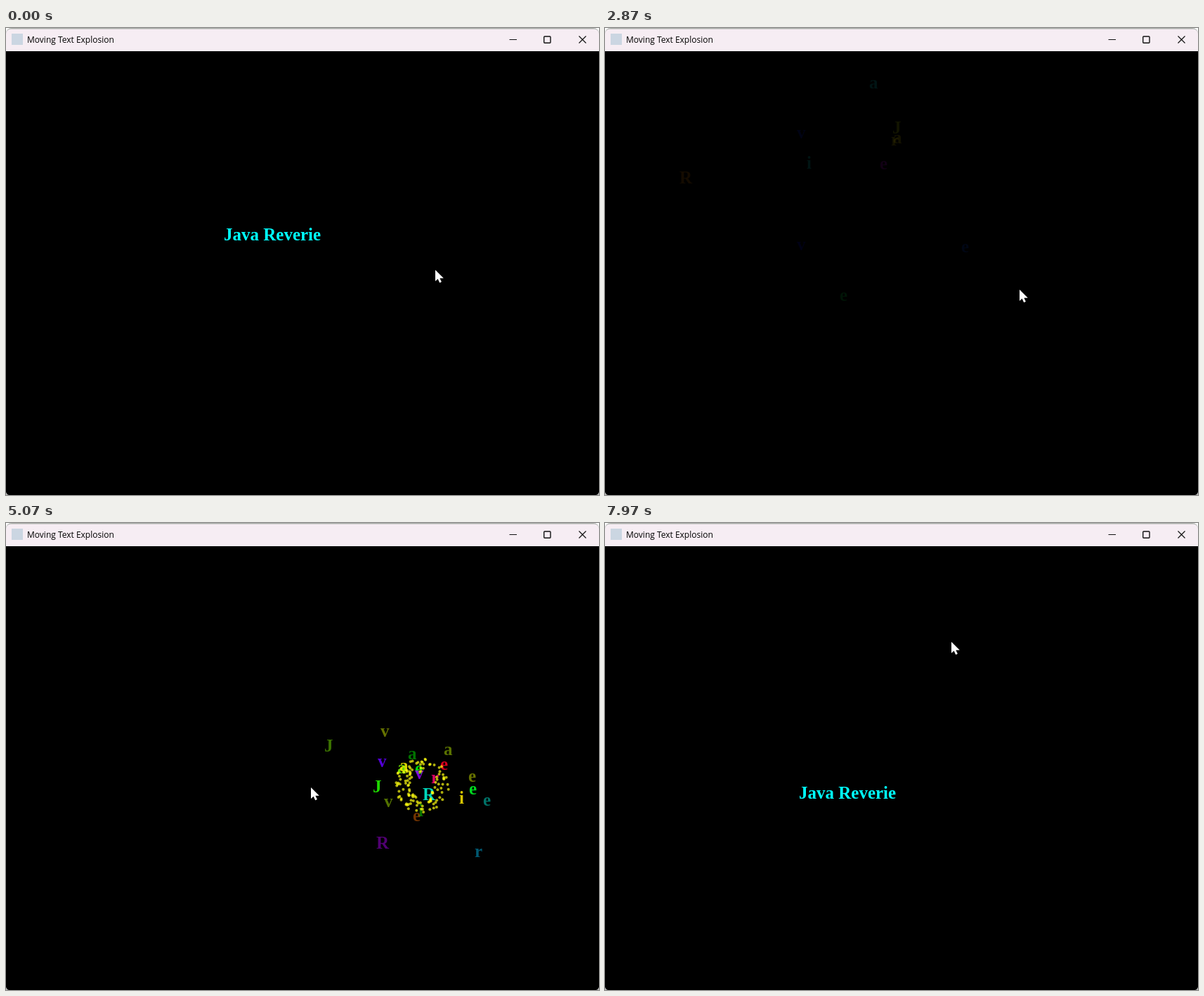
Write an HTML page with a canvas that moves like this. It is 844x664 px and loops after 8 s.

```html
<!DOCTYPE html>
<html lang="en">
<head>
<meta charset="utf-8">
<title>Moving Text Explosion</title>
<style>
  html, body { margin: 0; width: 100%; height: 100%; overflow: hidden; background: #000; }
  canvas { display: block; }
</style>
</head>
<body>
<canvas id="stage" width="844" height="664"></canvas>
<script>
const ctx = document.getElementById('stage').getContext('2d');
const WIDTH = 844, HEIGHT = 664, BAR_HEIGHT = 33;
const LOOP = 8000, LETTER_LIFE = 1780, SPARK_LIFE = 900, SPARK_COUNT = 115;
const TEXT = 'Java Reverie';
const TEXT_FONT = 'bold 25px "Liberation Serif", "Times New Roman", serif';
const CENTER = { x: 422, y: 348 };

// The text glides from the center to each target and bursts there.
const flights = [
  { x: 302, y: 219, start: -690, end: 1230 },
  { x: 590, y: 372, start: 2890, end: 4090 },
  { x: 590, y: 372, start: 2920, end: 4790 },
  { x: 343, y: 393, start: 6970, end: LOOP }
];

const pointerStart = { x: 611, y: 344 };
const pointerMoves = [
  { start: 150, end: 750, x: 604, y: 374 },
  { start: 1720, end: 2400, x: 590, y: 372 },
  { start: 3300, end: 3850, x: 445, y: 391 },
  { start: 4300, end: 4900, x: 434, y: 376 },
  { start: 5100, end: 5650, x: 343, y: 393 },
  { start: 7050, end: 7900, x: 493, y: 169 }
];

const mix = (a, b, k) => a + (b - a) * k;
const progress = ({ start, end }, time) => Math.min(1, Math.max(0, (time - start) / (end - start)));
const smooth = k => k * k * (3 - 2 * k);

function makeRandom(seed) {
  return () => (seed = (seed * 16807) % 2147483647) / 2147483647;
}

// Velocity in px/s, in any direction
function randomVelocity(random, slowest, fastest) {
  const angle = random() * 2 * Math.PI;
  const speed = mix(slowest, fastest, random());
  return { vx: speed * Math.cos(angle), vy: speed * Math.sin(angle) };
}

flights.forEach((flight, i) => {
  const random = makeRandom(7919 * (i + 3));
  flight.letters = [...TEXT].map(char => ({
    char, hue: 360 * random(), ...randomVelocity(random, 33, 122)
  }));
  flight.sparks = Array.from({ length: SPARK_COUNT }, () => randomVelocity(random, 62, 138));
});

function drawFlyingText(flight, time) {
  const k = progress(flight, time);
  ctx.fillStyle = '#0ff';
  ctx.fillText(TEXT,
    Math.round(mix(CENTER.x, flight.x, k) - ctx.measureText(TEXT).width / 2),
    Math.round(mix(CENTER.y, flight.y, k)));
}

function drawLetters({ x, y, letters }, age) {
  let left = x - ctx.measureText(TEXT).width / 2;
  ctx.globalAlpha = 1 - age / LETTER_LIFE;
  for (const { char, hue, vx, vy } of letters) {
    ctx.fillStyle = `hsl(${hue} 100% 50%)`;
    ctx.fillText(char, Math.round(left + vx * age / 1000), Math.round(y - 3 + vy * age / 1000));
    left += ctx.measureText(char).width;
  }
  ctx.globalAlpha = 1;
}

function drawSparks({ x, y, sparks }, age) {
  ctx.globalAlpha = 1 - age / SPARK_LIFE;
  ctx.fillStyle = '#ff1';
  for (const { vx, vy } of sparks) {
    ctx.beginPath();
    ctx.arc(x + 2 + vx * age / 1000, y + 1 + vy * age / 1000, 2, 0, 2 * Math.PI);
    ctx.fill();
  }
  ctx.globalAlpha = 1;
}

function drawFlight(flight, time) {
  const age = time - flight.end;
  if (time >= flight.start && age < 0) drawFlyingText(flight, time);
  if (age >= 0 && age < LETTER_LIFE) drawLetters(flight, age);
  if (age >= 0 && age < SPARK_LIFE) drawSparks(flight, age);
}

function fillBar(color, top, radius) {
  ctx.fillStyle = color;
  ctx.beginPath();
  ctx.roundRect(0, top, WIDTH, BAR_HEIGHT - top, [radius, radius, 0, 0]);
  ctx.fill();
}

function drawTitleBar() {
  fillBar('#fff', 0, 0);
  fillBar('#a9aea9', 0, 8);
  fillBar('#f6edf3', 1.5, 7);

  ctx.fillStyle = '#cbd6e2';
  ctx.fillRect(8, 8, 16, 16);

  ctx.fillStyle = '#000';
  ctx.font = '12px "Open Sans", "Noto Sans", sans-serif';
  ctx.fillText('Moving Text Explosion', 30, 21);

  // Minimise, close, maximise
  ctx.strokeStyle = '#111';
  ctx.lineWidth = 1.2;
  ctx.stroke(new Path2D('M716.5 16.5h10.5M815.5 11.5l10 10m0-10l-10 10'));
  ctx.lineWidth = 1.4;
  ctx.beginPath();
  ctx.roundRect(765.7, 12, 9.3, 9.3, 1);
  ctx.stroke();
}

function drawBottomCorners() {
  ctx.fillStyle = '#bbb';
  ctx.fill(new Path2D('M0 660Q1 663 4 664H0ZM844 660Q843 663 840 664H844Z'));
}

const arrow = new Path2D('M0 0V16L3.6 12.8L6.2 18.2L8.9 17L6.4 11.7H11.8Z');

function drawPointer(time) {
  let { x, y } = pointerStart;
  for (const move of pointerMoves) {
    const k = smooth(progress(move, time));
    x = mix(x, move.x, k);
    y = mix(y, move.y, k);
  }
  ctx.save();
  ctx.translate(Math.round(x), Math.round(y));
  ctx.fillStyle = '#fff';
  ctx.fill(arrow);
  ctx.restore();
}

function render() {
  const time = performance.now() % LOOP;
  ctx.fillStyle = '#000';
  ctx.fillRect(0, 0, WIDTH, HEIGHT);
  ctx.font = TEXT_FONT;
  flights.forEach(flight => drawFlight(flight, time));
  drawTitleBar();
  drawBottomCorners();
  drawPointer(time);
  requestAnimationFrame(render);
}
render();
</script>
</body>
</html>
```
